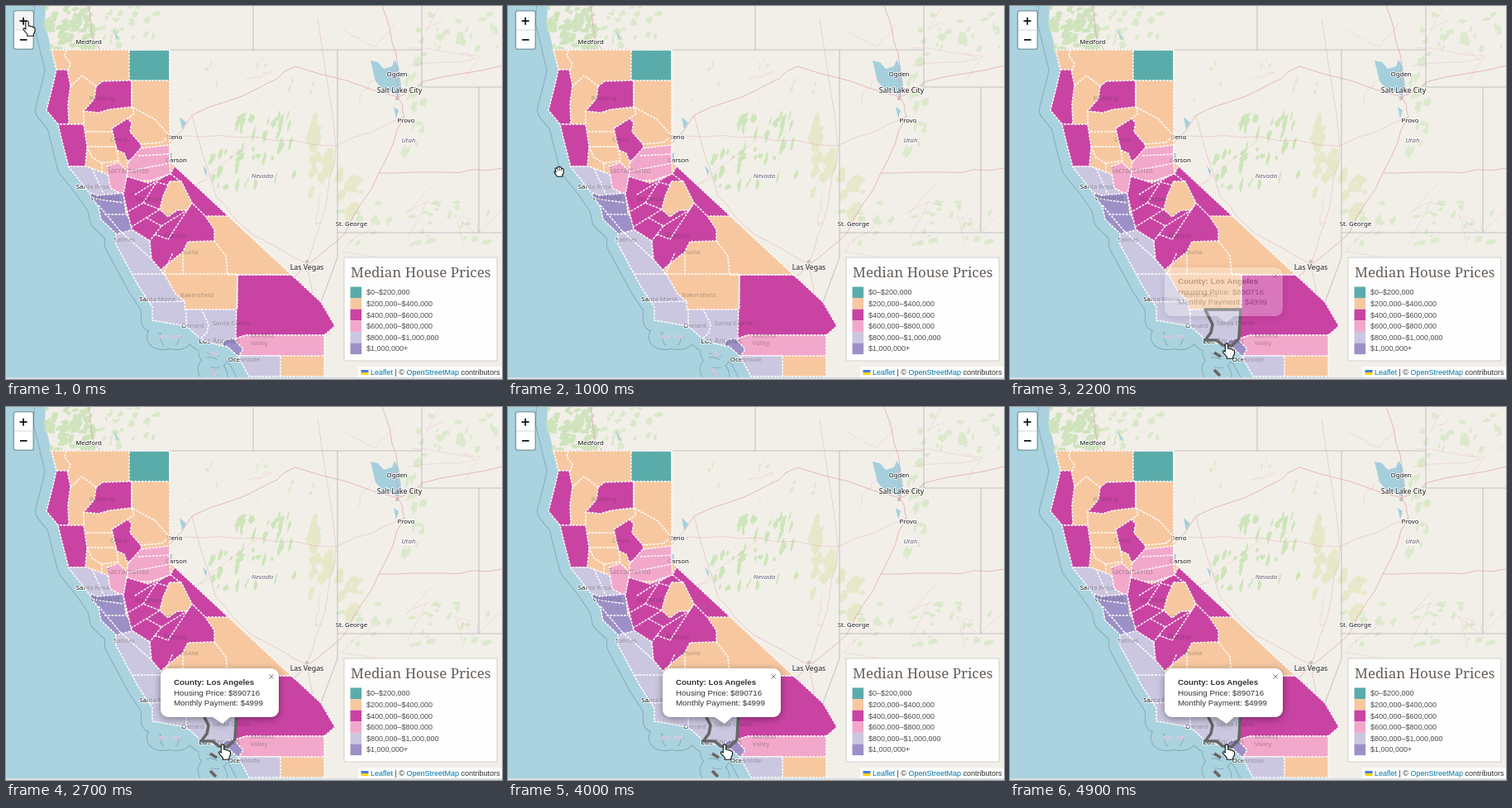
Write an HTML page that moves like this. It is 600x451 px and loops after 5000 ms.

```html
<!DOCTYPE html>
<html lang="en">
<head>
<meta charset="utf-8">
<title>Median House Prices</title>
<style>
html, body { margin: 0; width: 100%; height: 100%; overflow: hidden; background: #aad3df; }
svg { display: block; width: 600px; height: 451px; }
text { font-family: "Liberation Sans", Arial, sans-serif; }
.label { font-family: "Noto Sans", sans-serif; text-anchor: middle; fill: #333; }
#names .label { stroke: #fff; stroke-opacity: .75; stroke-width: 1.8px; paint-order: stroke; }
#ghosts { opacity: .35; }
.line { fill: none; stroke-linejoin: round; }
.edge { stroke: #fff; stroke-width: 1.5; stroke-dasharray: 2.8 1.4; stroke-linejoin: round; }
.teal { fill: #5aacaa; }
.orange { fill: #f7c8a0; }
.magenta { fill: #c943a3; }
.pink { fill: #f2a8ca; }
.lavender { fill: #cbc7e0; }
.purple { fill: #9d90c7; }
#popup { filter: drop-shadow(0 2px 5px rgba(0,0,0,.4)); }
.hand { fill: #fff; stroke: #111; stroke-width: 1.1; stroke-linejoin: round; }
</style>
</head>
<body>
<svg viewBox="0 0 600 451">
  <defs>
    <path id="state" d="M55 53H198V188L381 358 398 387 385 398V448H294L281 424 268 412 257 410 236 403 218 387 177 380V364L160 338 133 288V275L115 258 112 243 97 221 76 195 67 160 63 143 49 126 57 95 61 77Z"/>
    <g id="islands">
      <ellipse cx="190" cy="400" rx="6" ry="2"/>
      <ellipse cx="206" cy="400" rx="6" ry="2"/>
      <ellipse cx="251" cy="421" rx="5" ry="2" transform="rotate(30 251 421)"/>
      <ellipse cx="250" cy="443" rx="6" ry="2" transform="rotate(48 250 443)"/>
    </g>
    <g id="mass" stroke-linejoin="round">
      <path d="M49 -20L47 20 55 53 198 188 381 358 385 470H620V-20Z"/>
      <use href="#state"/>
      <use href="#islands"/>
    </g>
    <clipPath id="inside"><use href="#state"/></clipPath>
  </defs>

  <rect width="600" height="451" fill="#aad3df"/>
  <!-- offshore limit: a wide coast outline with its inside painted over -->
  <use href="#mass" stroke="#7fa9b5" stroke-width="28"/>
  <use href="#mass" fill="#aad3df" stroke="#aad3df" stroke-width="26.2"/>
  <use href="#mass" fill="#f2efe9"/>
  <g id="nature"></g>
  <path fill="#a5cfdd" d="M441 66l9 2 7 8 10-3 3-8 5 8 3 24-3 12-13-7-8-3-7-8zM469 122l6 4-3 10zM210 134l8 7-5 8zM238 193l5 6-1 7zM194 178h7l-1 13-5-2zM130 27l7 14-4-2z"/>
  <g id="roads" class="line" stroke="#e2a0a6" stroke-width=".8"></g>
  <path class="line" stroke="#9b98a4" stroke-width=".8" opacity=".7" d="M55 53H503V98H600M572 98V274M401 53V304L381 358M401 274H600M299 0V53M503 0V53"/>
  <g id="names"></g>

  <use href="#state" class="orange"/>
  <g class="edge" clip-path="url(#inside)">
    <path class="teal" d="M149 53H198V90H149Z"/>
    <path class="magenta" d="M40 77H74L78 96 75 118 76 143H40Z"/>
    <path class="magenta" d="M109 97L117 91 152 90V122L125 125 112 129 94 127 107 112Z"/>
    <path class="magenta" d="M40 143H94L98 170 96 194H40Z"/>
    <path class="magenta" d="M128 148L147 136 152 141 150 152 163 167 165 177 147 188 143 178 134 174Z"/>
    <path class="lavender" d="M40 194H98L122 203 138 231 126 240H40Z"/>
    <path class="pink" d="M147 190L163 172 198 168V190L199 203 175 211H146Z"/>
    <path class="pink" d="M122 194L136 189 147 200 143 229 126 220Z"/>
    <path class="lavender" d="M120 276L152 270 174 284 176 306 192 325 205 348 216 357V367H279V402L268 420H150Z"/>
    <path class="purple" d="M90 221L110 229 142 226 145 250 155 270 133 276 90 260Z"/>
    <path class="magenta" d="M146 206L172 214 199 203 204 193 270 254H241L252 270V284L220 285 214 297 187 319 176 306 174 284 152 270 142 228Z"/>
    <path class="orange" d="M198 212H212L225 238 219 247 207 247 196 255 186 246 190 230Z"/>
    <path class="magenta" d="M280 325H345L420 380 385 398H290L278 402Z"/>
    <path class="pink" d="M278 402L290 398H400V423H270Z"/>
    <path class="lavender" d="M270 423H332V460H270Z"/>
    <path class="purple" d="M264 404L275 402 287 415 281 424 260 415Z"/>
    <g class="line">
      <path d="M73 53L71 60 78 70 75 78M78 97L92 84 109 97M152 90V122L180 137 198 157 188 165 163 167M94 127V143M97 152H130M98 170H134M98 170L104 183 116 190 136 187 134 174M116 190V203M152 122L155 130 147 136"/>
      <path d="M160 181L198 179M147 200L198 190M104 196L118 227M100 232L142 238M119 252H145M112 241L138 272M156 228L190 207M166 238L182 213 198 217M199 203L212 213M145 250L166 238 186 246 150 268M170 256L188 266 174 284M188 266L219 247M180 276L196 282 225 238 241 254"/>
      <path d="M138 272L176 306M150 324H280V367M190 325L202 298M214 325V297M252 284L266 302 268 325H345M160 358L216 357M218 366V390M236 366L245 385 243 395 230 407"/>
    </g>
  </g>
  <use href="#state" class="line edge"/>
  <use href="#islands" class="lavender"/>
  <g id="ghosts"></g>
  <g id="hover" class="line" stroke="#666" stroke-width="3.6">
    <path d="M236 367H279L277 402 268 411 257 410 250 404 236 404 243 395 245 385Z"/>
    <path d="M247 419l8 5M247 440l7 7"/>
  </g>

  <g id="popup">
    <path fill="#fff" d="M196 316H321a9 9 0 0 1 9 9V366a9 9 0 0 1-9 9H271L262 383 250 375H196a9 9 0 0 1-9-9V325a9 9 0 0 1 9-9z"/>
    <g font-size="9.75" fill="#333">
      <text x="203" y="336" font-weight="bold">County: Los Angeles</text>
      <text x="203" y="348.7">Housing Price: $890716</text>
      <text x="203" y="361.4">Monthly Payment: $4999</text>
    </g>
    <path class="line" stroke="#757575" d="M318.6 323.2l5.2 5.2m0-5.2l-5.2 5.2"/>
  </g>

  <rect x="8.5" y="5" width="25.5" height="48" rx="3.5" opacity=".23"/>
  <rect x="10" y="6.5" width="22.5" height="45" rx="2" fill="#fff"/>
  <rect id="plus" x="10" y="6.5" width="22.5" height="22.3" rx="2" fill="#f4f4f4"/>
  <path class="line" stroke="#ccc" stroke-width=".8" d="M10 29H32.5"/>
  <path class="line" stroke="#111" stroke-width="1.7" d="M16.5 18.2h9M21 13.7v9M17 40.8h8.5"/>

  <g id="legend">
    <rect x="409" y="304" width="185" height="125" fill="#fff" fill-opacity=".96" stroke="#d2d0cd"/>
    <text x="417" y="328" font-size="16.95" fill="#665e59" style="font-family:'Noto Serif',serif">Median House Prices</text>
  </g>
  <rect x="426" y="436" width="174" height="13" fill="#fff" opacity=".8"/>
  <rect x="429.5" y="440" width="9" height="3" fill="#4c7be1"/>
  <rect x="429.5" y="443" width="9" height="3" fill="#ffd500"/>
  <text x="441" y="446" font-size="9" fill="#333"><tspan fill="#0078a8">Leaflet</tspan> | © <tspan fill="#0078a8">OpenStreetMap</tspan> contributors</text>
  <rect y="449" width="600" height="2" fill="#d9dde3"/>

  <g id="cursor">
    <path id="point" class="hand" d="M-1.7 1.2Q0-1.4 1.7 1.2V6.3Q4 5.3 4.5 7 6.8 6.2 7.3 7.9 9.3 7.5 9.5 9.5V12.5L7.8 16V18.3H.3V16L-4.3 10.8Q-5.2 8.6-3.1 8.8L-1.7 10.2Z"/>
    <g id="grab">
      <path class="hand" d="M-3.9 1.3L-5-3.2Q-4.2-5-2.8-3.5L-2.2-5Q-.9-6.6.2-5 1.7-6.2 2.6-4.4V-3.2Q4.6-4.2 5.2-2.3V2L3.8 4.4V6.2H-2.5L-5.8 1.6Q-6.4-.4-4.6 0Z"/>
      <path class="line" stroke="#222" stroke-width=".8" d="M-2.5-3.5l.6 3M.2-4.6V-.6M2.6-3.8V-.6"/>
    </g>
  </g>
</svg>
<script>
const $ = id => document.getElementById(id);

function add(parent, tag, attrs, text) {
  const el = document.createElementNS("http://www.w3.org/2000/svg", tag);
  for (const key in attrs) el.setAttribute(key, attrs[key]);
  if (text) el.textContent = text;
  parent.append(el);
}

let seed = 11;
const rand = () => (seed = (seed * 16807) % 2147483647) / 2147483647;
const spread = size => (rand() - .5) * size;

// Ragged patch leaning slightly to the east
function patch(x, y, w, h) {
  const points = [];
  for (let a = 0; a < 6.2; a += .57) {
    const r = .5 + rand() * .7, dy = Math.sin(a) * r * h;
    points.push([x + Math.cos(a) * r * w - dy * .25, y + dy]);
  }
  return "M" + points.join("L") + "Z";
}

// x, y, width, height, count, patch width, patch height, colour
const woods = [
  [50, 0, 58, 52, 65, 5, 5, "#cfe3bd"],
  [105, 0, 88, 48, 26, 4, 4, "#dbe8cb"],
  [490, 5, 105, 55, 28, 4, 5, "#dce9cd"],
  [480, 60, 28, 130, 20, 4, 6, "#dce9cd"],
  [220, 60, 160, 60, 14, 2, 4, "#dce9cd"],
  [362, 135, 30, 100, 16, 6, 13, "#e7e8ca"],
  [402, 205, 30, 50, 10, 7, 8, "#e7e8ca"],
  [278, 130, 72, 90, 34, 3, 8, "#cde5ba"],
  [240, 170, 36, 55, 9, 3, 7, "#cde5ba"],
  [400, 235, 190, 55, 32, 5, 4, "#dce9cd"]
];
for (const [x, y, w, h, n, pw, ph, fill] of woods) {
  let d = "";
  for (let i = 0; i < n; i++)
    d += patch(x + rand() * w, y + rand() * h, pw * (.4 + rand()), ph * (.4 + rand()));
  add($("nature"), "path", { d, fill });
}

// Winding road through a few key points
function road(points, opacity) {
  let d = "M" + points[0];
  for (let i = 1; i < points.length; i++) {
    const [x0, y0] = points[i - 1], [x1, y1] = points[i];
    for (let k = .25; k < 1; k += .25)
      d += "L" + [x0 + (x1 - x0) * k + spread(4), y0 + (y1 - y0) * k + spread(4)];
    d += "L" + points[i];
  }
  add($("roads"), "path", { d, opacity });
}
road([[198, 166], [225, 132], [304, 100], [350, 73], [474, 110], [503, 92], [600, 72]], .9);
road([[455, 0], [472, 58], [474, 110], [482, 134], [451, 202], [410, 275], [365, 312], [270, 404]], .9);
road([[451, 202], [531, 201], [600, 196]], .8);
road([[215, 157], [301, 158], [399, 169], [482, 134]], .5);
road([[225, 132], [254, 230], [298, 276], [364, 312], [382, 394]], .6);
road([[377, 15], [399, 169], [386, 246], [364, 312]], .5);
road([[100, 0], [105, 38], [113, 53]], .9);
for (let i = 0; i < 14; i++) {
  const x = 230 + rand() * 340, y = rand() * 290;
  road([[x, y], [x + spread(90), y + spread(70)], [x + spread(160), y + spread(130)]], .35);
}

// text, centre x, centre y, size
const places = [
  ["Medford", 100, 43], ["Ogden", 473, 82], ["Salt Lake City", 476, 102, 8.8],
  ["Provo", 484, 138], ["St. George", 418, 263], ["Las Vegas", 364, 316, 8.8],
  ["Reno", 204, 158], ["Carson", 206, 186], ["Redding", 116, 111],
  ["Chico", 136, 161], ["Sacramento", 147, 199, 9.2], ["Santa Rosa", 105, 218],
  ["Oakland", 120, 232, 8.8], ["Stockton", 172, 233], ["Fresno", 205, 278, 8.8],
  ["Salinas", 143, 282], ["Visalia", 221, 297], ["Bakersfield", 231, 349],
  ["Santa Maria", 183, 354], ["Oxnard", 226, 386], ["Santa Clarita", 273, 383],
  ["Los Angeles", 258, 405, 8.8], ["Moreno", 310, 398], ["Valley", 306, 407],
  ["Oceanside", 288, 427]
];
const regions = [["Nevada", 310, 205], ["Utah", 487, 162], ["California", 193, 252]];

function label(layer, [name, x, y, size = 7.8], style = "") {
  add(layer, "text", { class: "label", x, y: y + size * .35, "font-size": size, style }, name);
}
for (const layer of [$("names"), $("ghosts")]) {
  places.forEach(p => label(layer, p));
  regions.forEach(r => label(layer, r, "font-style:italic;fill:#77707e"));
}
for (const [cx, cy] of [[473, 112], [364, 309]])
  add($("names"), "circle", { cx, cy, r: 1.4, fill: "#fff", stroke: "#666", "stroke-width": .6 });

const bands = {
  teal: "$0–$200,000", orange: "$200,000–$400,000", magenta: "$400,000–$600,000",
  pink: "$600,000–$800,000", lavender: "$800,000–$1,000,000", purple: "$1,000,000+"
};
Object.entries(bands).forEach(([name, range], i) => {
  const y = 339.5 + i * 13.6;
  add($("legend"), "rect", { class: name, x: 416.5, y, width: 13.6, height: 13.6 });
  add($("legend"), "text", { x: 436, y: y + 9.8, "font-size": 9, fill: "#4c4c4c" }, range);
});

// time, x, y of the pointer
const moves = [
  [0, 25.5, 18], [100, 26, 18.5], [600, 66, 37], [900, 46, 150],
  [1200, 94, 300], [1500, 171, 393.5], [2000, 262, 408], [5000, 262, 408]
];

function place(t) {
  const i = moves.findIndex(m => m[0] > t);
  const [t0, x0, y0] = moves[i - 1], [t1, x1, y1] = moves[i];
  const k = (t - t0) / (t1 - t0);
  return [x0 + (x1 - x0) * k, y0 + (y1 - y0) * k];
}

const show = (id, on) => { $(id).style.display = on ? "" : "none"; };

function draw(now) {
  const t = Math.floor((now - start) % 5000 / 100) * 100;
  const [x, y] = place(t);
  const overZoom = x < 33 && y < 29;
  const overCounty = x > 236;
  $("cursor").setAttribute("transform", `translate(${x} ${y})`);
  show("point", overZoom || overCounty);
  show("grab", !overZoom && !overCounty);
  show("plus", overZoom);
  show("hover", overCounty);
  $("popup").style.opacity = Math.min(1, Math.max(0, (t - 2130) / 250));
}

const start = performance.now();
function loop() {
  draw(performance.now());
  requestAnimationFrame(loop);
}
loop();
</script>
</body>
</html>
```
